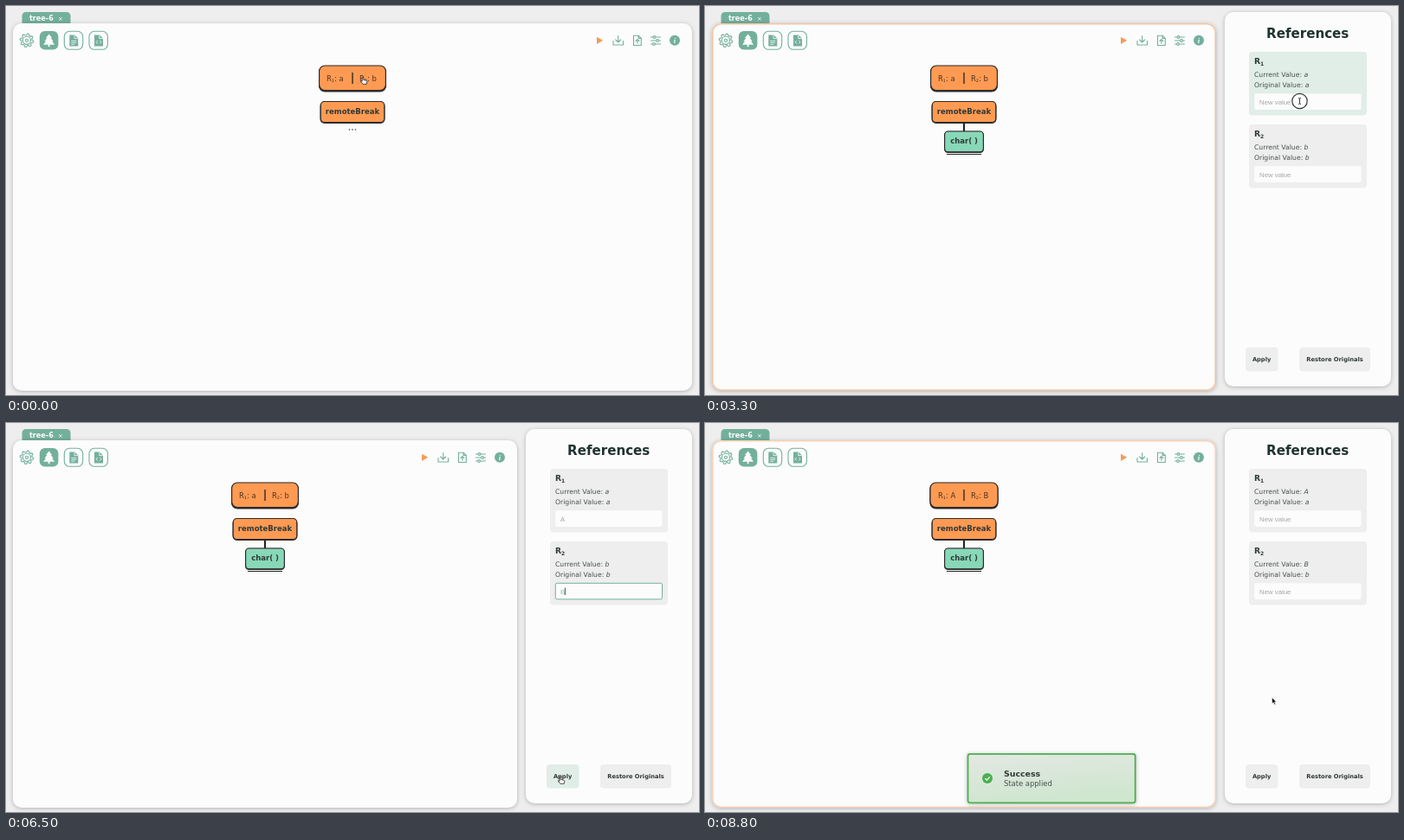
An HTML page that plays this animation: 800x450 px, repeating every 8.9 s.

```html
<!DOCTYPE html>
<html lang="en">
<head>
<meta charset="utf-8">
<title>Tree references</title>
<style>
  html, body { margin: 0; width: 100%; height: 100%; overflow: hidden; background: #eee; }
  svg { display: block; width: 800px; height: 450px; font-family: "DejaVu Sans", Verdana, sans-serif; fill: #2f3a38; }
  .bold { font-weight: bold; }
  .mid { text-anchor: middle; }
  .line { fill: none; stroke: #73b09c; stroke-width: 1.1; stroke-linecap: round; stroke-linejoin: round; }
  .teal { fill: #73b09c; }
  .white { fill: #fcfcfc; }
  .ink { fill: none; stroke: #222; }
  .node { stroke: #2b2b2b; stroke-width: 1.2; }
  .field { font: 7.8px "Liberation Sans", Arial, sans-serif; }
  .soft { filter: drop-shadow(0 1px 2.5px rgba(0, 0, 0, .25)); }
</style>
</head>
<body>
<svg viewBox="0 0 800 450">
  <defs>
    <linearGradient id="mint" x1="0" y1="0" x2=".3" y2="1">
      <stop offset="0" stop-color="#e3e8e3"/><stop offset="1" stop-color="#cfe6cf"/>
    </linearGradient>
  </defs>
  <rect width="800" height="450" fill="#eee"/>
  <path class="teal" d="M18.500 20v-8q0-5 5-5h46q5 0 5 5v8z"/>
  <text class="bold white" x="27" y="17" font-size="8.100">tree-6</text>
  <text class="mid white" x="63" y="16.600" font-size="7">×</text>
  <rect id="main" class="white soft" x="8" y="20" width="784" height="425" rx="10"/>
  <rect id="border" x="8.800" y="20.800" width="782.400" height="423.400" rx="9.500" fill="none" stroke="#f0a068" stroke-width="1.600"/>

  <path id="gear" class="line"/>
  <circle class="line" cx="24" cy="39.800" r="4.600"/>
  <circle class="line" cx="24" cy="39.800" r="1.600"/>
  <rect class="teal" x="38.800" y="29" width="21.600" height="21.600" rx="6"/>
  <path class="white" d="M49.600 32.500l3.600 4.600h-1.500l3 3.700h-1.600l3 4h-5.600v2.400h-1.800v-2.400h-5.600l3-4h-1.600l3-3.700h-1.500z"/>
  <rect class="line" x="67.300" y="29.300" width="21.400" height="21" rx="6"/>
  <path class="teal" d="M73.300 33.500h6l4 4v9h-10z"/>
  <path d="M79 33.800v3.800h4M75.300 40.300h6M75.300 42.300h6M75.300 44.300h4" fill="none" stroke="#fcfcfc" stroke-width=".8"/>
  <rect class="line" x="96" y="29.300" width="21.400" height="21" rx="6"/>
  <path class="teal" d="M102 33.500h6l4 4v9h-10z"/>
  <path d="M107.800 33.800v3.800h4M105.700 40l-1.700 1.700 1.700 1.700M108.300 40l1.700 1.700-1.700 1.700" fill="none" stroke="#fcfcfc" stroke-width=".9"/>

  <g id="tools">
    <path d="M682 35.700l7.200 4.100-7.200 4.100z" fill="#f79a56"/>
    <path class="line" d="M701 40.500v4.500h11.500v-4.500M706.700 34.500v7.300M703.700 39l3 3 3-3"/>
    <path class="line" d="M724.500 34.200h5.500l3.300 3.300v8h-8.800zM730 34.200v3.300h3.300M728.900 43.300v-4.500M727 40.500l1.900-1.900 1.900 1.900"/>
    <path class="line" d="M744.500 36h2.500M750 36h5.500M744.500 40h6M753.500 40h2M744.500 44h2M749.500 44h6"/>
    <g class="line"><circle cx="748.500" cy="36" r="1.400"/><circle cx="752" cy="40" r="1.400"/><circle cx="748" cy="44" r="1.400"/></g>
    <circle class="teal" cx="772" cy="39.700" r="6"/>
    <text class="mid white" x="772" y="43" font-size="9" font-style="italic" font-weight="bold" font-family="Liberation Serif, serif">i</text>
  </g>

  <g id="tree">
    <rect id="refShade" class="node" y="70" height="29" rx="6.500" fill="#2b2b2b"/>
    <rect id="refBox" class="node" y="69" height="28.500" rx="6.500" fill="#ff9a52"/>
    <g font-size="8.400" fill="#4c3322">
      <text x="370" y="86.500">R<tspan font-size="5" dy="1.500">1</tspan><tspan dy="-1.500" id="now0"></tspan></text>
      <text x="408" y="86.500">R<tspan font-size="5" dy="1.500">2</tspan><tspan dy="-1.500" id="now1"></tspan></text>
    </g>
    <path class="ink" d="M400 77v13" stroke-width="1.300"/>
    <g id="child">
      <path class="ink" d="M400 135v10" stroke-width="2"/>
      <rect class="node" x="377.600" y="145.400" width="44.800" height="24" rx="4" fill="#2b2b2b"/>
      <rect class="node" x="377.600" y="145" width="44.800" height="23.800" rx="4" fill="#88d8b8"/>
      <text class="bold mid" x="400" y="159.400" font-size="8.500">char( )</text>
      <path class="ink" d="M380 171.500h40" stroke-width="1.200"/>
    </g>
    <rect class="node" x="363.200" y="111.200" width="73.600" height="24.300" rx="4.500" fill="#2b2b2b"/>
    <rect class="node" x="363.200" y="110.500" width="73.600" height="24" rx="4.500" fill="#ff9a52"/>
    <text class="bold mid" x="400" y="124.700" font-size="8.500">remoteBreak</text>
    <g id="dots"><circle cx="396.500" cy="143" r=".8"/><circle cx="400" cy="143" r=".8"/><circle cx="403.500" cy="143" r=".8"/></g>
  </g>

  <g id="panel">
    <rect class="white soft" x="600" y="7" width="192" height="433" rx="10"/>
    <text class="bold mid" x="695.700" y="36.800" font-size="15.100" fill="#1f3330">References</text>
    <g id="cards"></g>
    <rect id="apply" x="624" y="395" width="37.500" height="27.500" rx="4"/>
    <text class="bold mid" x="642.600" y="411.200" font-size="6.700">Apply</text>
    <rect x="686" y="395" width="82" height="27.500" rx="4" fill="#eee"/>
    <text class="bold mid" x="727" y="411.200" font-size="6.700">Restore Originals</text>
  </g>

  <g id="toast">
    <rect class="soft" x="303.500" y="382.800" width="193.200" height="56.500" rx="2.500" fill="url(#mint)" stroke="#4caf50" stroke-width="1.800"/>
    <circle cx="326" cy="411" r="6" fill="#4caf50"/>
    <path d="M323.300 411.200l2 2 3.500-3.800" fill="none" stroke="#fff" stroke-width="1.200"/>
    <text class="bold" x="345" y="408.900" font-size="9.400">Success</text>
    <text x="345" y="419.700" font-size="8.400" fill="#46504c">State applied</text>
  </g>

  <circle id="ring" r="8.700" fill="#fff" fill-opacity=".55" stroke="#333" stroke-width="1.200"/>
  <g id="arrow"><path d="M0 0v7.300l1.700-1.500 1.200 2.700 1.300-.6-1.200-2.600h2.300z" fill="#111" stroke="#fff" stroke-width=".6"/></g>
  <g id="hand"><path d="M-.8.500q.8-1 1.600 0v3l3.200.8q.9.300.8 1.300l-.6 2.700h-4.200l-2.800-3.300q.4-1 2 .3z" fill="#fff" stroke="#222" stroke-width=".8"/></g>
  <g id="beam"><path class="ink" d="M-1.500-3.500q1.500 0 1.500 1v5q0 1-1.500 1M1.500-3.500q-1.500 0-1.500 1M0 2.500q0 1 1.500 1" stroke-width=".9"/></g>
</svg>
<script>
const LOOP = 8900, STEP = 100;
const OPEN = 1900, APPLIED = 6700;
const EXPAND = 400;
const $ = id => document.getElementById(id);
const set = (id, attrs) => { for (const k in attrs) $(id).setAttribute(k, attrs[k]); };
const show = (id, on) => { $(id).style.display = on ? '' : 'none'; };
const move = (id, x, y = 0) => set(id, { transform: `translate(${x} ${y})` });
const clamp = v => Math.max(0, Math.min(1, v));
const ease = v => v * v * (3 - 2 * v);

// Pointer stops: time, x, y
const path = [
  [0, 412, 82], [300, 407, 119], [700, 407, 119], [1300, 727, 119], [1700, 749, 39],
  [2200, 749, 39], [3000, 686.5, 110], [4300, 686.5, 110], [4800, 670, 199],
  [5600, 670, 199], [6300, 640, 409], [8200, 640, 409], [8800, 654.5, 317.5]
];
const clicks = [400, 1800, 3300, 4900, 6600];
const cards = [
  { y: 53, from: 3400, to: 4900, typed: 4000, low: 'a', up: 'A' },
  { y: 137, from: 4900, to: APPLIED, typed: 5500, low: 'b', up: 'B' }
];

$('cards').innerHTML = cards.map((c, i) => `
  <g transform="translate(0 ${c.y})">
    <rect id="card${i}" x="628" width="136" height="73.500" rx="4"/>
    <text class="bold" x="634" y="14" font-size="9.200">R<tspan font-size="6" dy="2">${i + 1}</tspan></text>
    <g font-size="7.700" fill="#46504c">
      <text x="634" y="28.800">Current Value: <tspan id="cur${i}" font-style="italic"></tspan></text>
      <text x="634" y="41">Original Value: <tspan font-style="italic">${c.low}</tspan></text>
    </g>
    <rect id="input${i}" class="white" x="634.300" y="48.300" width="123.200" height="18.600" rx="2"/>
    <text id="value${i}" class="field" x="640" y="60.500"></text>
    <path id="caret${i}" class="ink" stroke-width=".8" d="M0 53.500v8.500"/>
  </g>`).join('');

const teeth = Array.from({ length: 32 }, (_, i) => {
  const r = i % 4 < 2 ? 7.8 : 6.1, a = (i + .5) * Math.PI / 16;
  return `${(24 + r * Math.cos(a)).toFixed(2)} ${(39.8 + r * Math.sin(a)).toFixed(2)}`;
});
set('gear', { d: `M${teeth.join('L')}z` });

function pointerAt(t) {
  const i = Math.max(1, path.findIndex(p => p[0] >= t));
  const [t0, x0, y0] = path[i - 1], [t1, x1, y1] = path[i];
  const k = ease(clamp((t - t0) / (t1 - t0)));
  return [x0 + (x1 - x0) * k, y0 + (y1 - y0) * k];
}

function drawLayout(t) {
  const open = ease(clamp((t - OPEN) / 200)), shrink = 202 * open;
  set('main', { width: 784 - shrink });
  set('border', { width: 782.4 - shrink });
  const phase = t < OPEN ? (t - 100) / 2400 : (t - 6500) / 1860;
  $('border').style.opacity = (1 - Math.cos(2 * Math.PI * phase)) / 2;
  move('tools', -shrink);
  move('tree', -shrink / 2);
  $('panel').style.opacity = open;
}

function drawCards(t, x, y) {
  cards.forEach((c, i) => {
    const value = t >= APPLIED ? c.up : c.low;
    const typed = t >= c.typed && t < APPLIED;
    const focus = t >= c.from && t < c.to;
    const over = x > 628 && x < 764 && y > c.y && y < c.y + 73.5;
    set('card' + i, { fill: over ? '#e1ede7' : '#eee' });
    set('input' + i, { stroke: focus ? '#73b09c' : 'none' });
    set('value' + i, { fill: typed && focus ? '#8dbdac' : '#a5a5a5' });
    $('value' + i).textContent = typed ? c.up : 'New value';
    $('cur' + i).textContent = value;
    $('now' + i).textContent = ': ' + value;
    move('caret' + i, typed ? 645.4 : 640.3);
    show('caret' + i, focus && (t - (typed ? c.typed : c.from)) % 1000 < 500);
  });
}

function drawPointer(t, x, y) {
  const inside = (l, top, r, b) => x > l && x < r && y > top && y < b;
  const open = t >= OPEN;
  const text = open && cards.some(c => inside(634, c.y + 48, 758, c.y + 67));
  const hand = open ? inside(624, 395, 662, 423)
    : inside(361, 69, 439, 136) || inside(740, 30, 760, 50);
  for (const [id, on] of [['beam', text], ['hand', hand], ['arrow', !text && !hand]]) {
    show(id, on);
    move(id, x, y);
  }
  show('ring', clicks.some(c => t >= c && t < c + 100));
  move('ring', x, y);
  set('apply', { fill: open && hand ? '#e1ede7' : '#eee' });
}

function draw(t) {
  const [x, y] = pointerAt(t);
  drawLayout(t);
  drawCards(t, x, y);
  drawPointer(t, x, y);
  show('child', t >= EXPAND);
  show('dots', t < EXPAND);
  const half = t >= APPLIED ? 39 : 38.4;
  for (const id of ['refBox', 'refShade']) set(id, { x: 400 - half, width: 2 * half });
  show('toast', t >= APPLIED);
  move('toast', 0, 75 * Math.exp((APPLIED - t) / 95));
}

const start = performance.now();
function tick() {
  const t = (performance.now() - start) % LOOP;
  draw(Math.floor(t / STEP) * STEP);
  requestAnimationFrame(tick);
}
tick();
</script>
</body>
</html>
```
